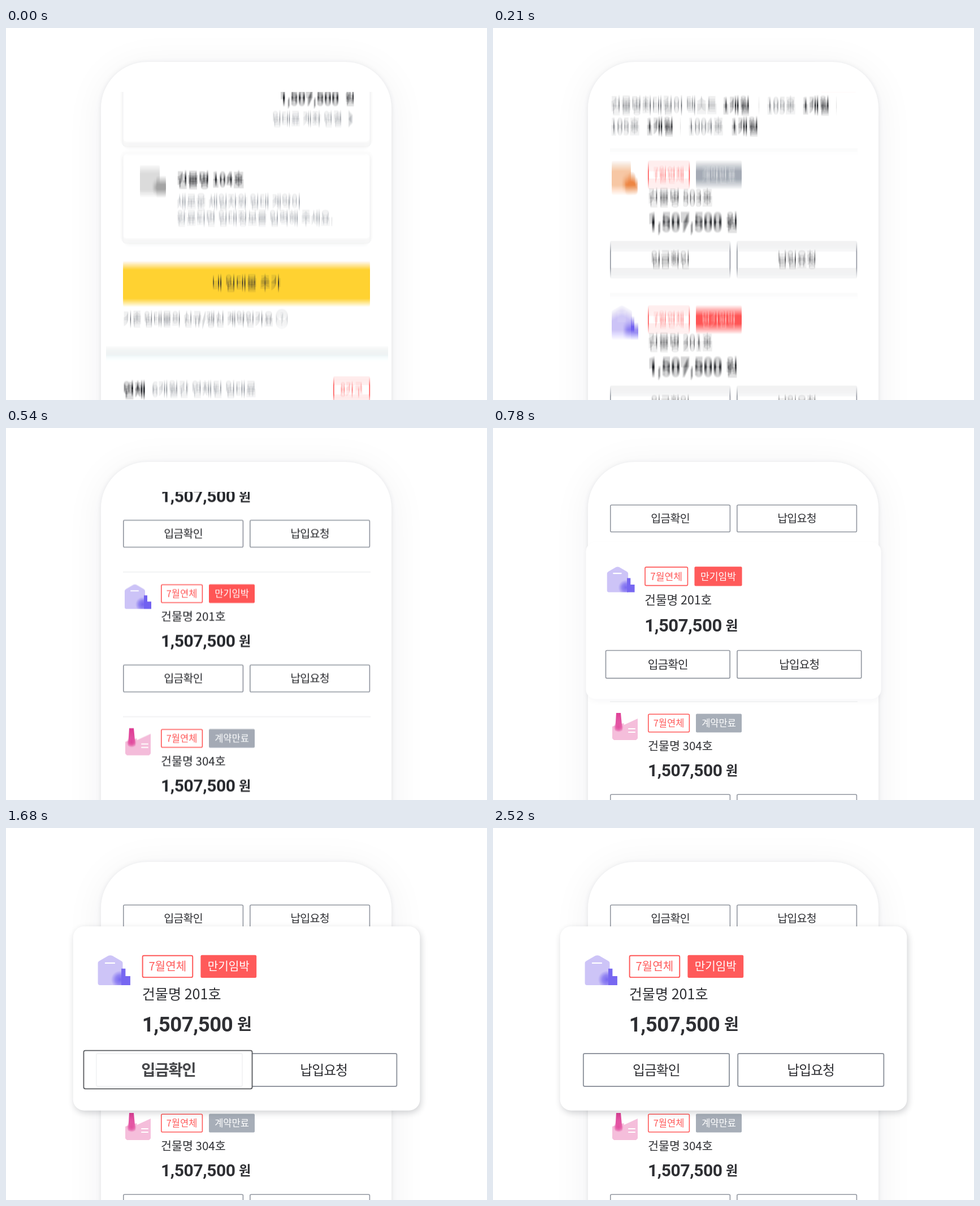
These frames come from a looping animation (851x658 px, 2550 ms). An HTML page with a canvas:

```html
<!DOCTYPE html>
<html lang="ko">
<head>
<meta charset="utf-8">
<style>
  html, body { margin: 0; width: 100%; height: 100%; overflow: hidden; background: #fff; }
  canvas { display: block; }
</style>
</head>
<body>
<canvas id="stage" width="851" height="658"></canvas>
<script>
const LOOP = 2550, STEP = 30, ZOOM = 1.22;
const KOREAN = '"Noto Sans CJK KR", "Noto Sans CJK", sans-serif';
const INK = '#2e2f33', GRAY = '#8d9299', RED = '#ff5a5a', SILVER = '#a7aeb8', LINE = '#9297a0';
const PIVOT = { x: 425.5, y: 361.5 };
const END_SCROLL = 802;

const stage = document.getElementById('stage').getContext('2d');
const list = document.createElement('canvas');
list.width = 851;
list.height = 1560;

const clamp = v => Math.min(1, Math.max(0, v));
const progress = (t, from, to) => clamp((t - from) / (to - from));
const easeOut = k => 1 - (1 - k) ** 2;

// y is the optical middle of the line
function text(g, str, x, y, size, color = INK, weight = 300, align = 'left', track = 0) {
  g.font = `${weight} ${size}px ${KOREAN}`;
  g.letterSpacing = track + 'px';
  g.textAlign = align;
  g.fillStyle = color;
  g.fillText(str, x, y + size * 0.37);
}

function amount(g, x, y, size, wonX) {
  g.font = `700 ${size}px Roboto, sans-serif`;
  g.letterSpacing = size * -0.013 + 'px';
  g.textAlign = 'left';
  g.fillStyle = INK;
  g.fillText('1,507,500', x, y + size * 0.36);
  text(g, '원', wonX, y, size * 0.77, INK, 700);
}

function box(g, x, y, w, h, r, fill, stroke, line = 1.6) {
  g.beginPath();
  g.roundRect(x, y, w, h, r);
  if (fill) { g.fillStyle = fill; g.fill(); }
  if (stroke) { g.strokeStyle = stroke; g.lineWidth = line; g.stroke(); }
}

function shadowBox(g, rect, r, shadows) {
  g.save();
  for (const [alpha, blur, dx, dy] of shadows) {
    g.shadowColor = `rgba(30,35,45,${alpha})`;
    g.shadowBlur = blur;
    g.shadowOffsetX = dx;
    g.shadowOffsetY = dy;
    box(g, ...rect, r, '#fff');
  }
  g.restore();
}

function shape(g, fill, ...points) {
  g.beginPath();
  points.forEach(([x, y]) => g.lineTo(x, y));
  g.closePath();
  g.fillStyle = fill;
  g.fill();
}

function glow(g, x, y, r, rgb) {
  const soft = g.createRadialGradient(x, y, 0, x, y, r);
  soft.addColorStop(0, `rgba(${rgb},.95)`);
  soft.addColorStop(0.5, `rgba(${rgb},.65)`);
  soft.addColorStop(1, `rgba(${rgb},0)`);
  g.fillStyle = soft;
  g.fillRect(x - r, y - r, 2 * r, 2 * r);
}

const icons = {
  house(g) {
    g.save();
    g.beginPath();
    g.moveTo(0, 12);
    g.quadraticCurveTo(0, 10, 3, 8.5);
    g.lineTo(15, 1.5);
    g.quadraticCurveTo(18, 0, 21, 1.5);
    g.lineTo(33, 8.5);
    g.quadraticCurveTo(36, 10, 36, 12);
    g.lineTo(36, 44);
    g.lineTo(3, 44);
    g.quadraticCurveTo(0, 44, 0, 41);
    g.fillStyle = '#cdc4f7';
    g.fill();
    g.clip();
    glow(g, 32, 36, 13, '116,100,240');
    g.restore();
    box(g, 10, 11, 15, 2, 1, '#fff');
    shape(g, '#7767f1', [34, 20], [40, 20], [40, 31], [47, 31], [47, 44], [34, 44]);
  },
  factory(g) {
    shape(g, '#f5bedb', [1, 23], [21, 17], [22, 20], [46, 9], [46, 44], [43, 47], [4, 47], [1, 44]);
    const fade = g.createLinearGradient(0, -1, 0, 33);
    fade.addColorStop(0, '#df3f96');
    fade.addColorStop(0.55, '#e45aa6');
    fade.addColorStop(1, '#f5bedb');
    shape(g, fade, [8, -1], [16, -1], [19, 30], [14, 33], [6, 30]);
    glow(g, 12, 24, 9, '226,75,158');
    box(g, 29, 26, 13, 2, 1, '#fff');
    box(g, 29, 32, 13, 2, 1, '#fff');
  },
  villa(g) {
    box(g, 0, 1, 34, 43, 3, '#f7c8a6');
    glow(g, 31, 33, 14, '236,130,60');
    box(g, 24, 29, 22, 15, 5, '#ee8a4a');
    box(g, 28, 20, 14, 18, 7, '#ee8a4a');
  },
  office(g) {
    box(g, 0, 1, 35, 43, 2, '#dcdcdc');
    glow(g, 33, 33, 12, '150,150,150');
    box(g, 29, 20, 17, 24, 2, '#aaa');
  }
};

function icon(g, name, x, y) {
  g.save();
  g.translate(x, y);
  icons[name](g);
  g.restore();
}

function button(g, x, y, label) {
  box(g, x + 0.8, y - 23.7, 211.6, 47.4, 2, '#fff', LINE);
  text(g, label, x + 106.5, y, 19.5, INK, 300, 'center', -0.8);
}

// y is the middle of the tag row
function item(g, y, name, iconName, tag, tagColor) {
  icon(g, iconName, 210, y - 17);
  box(g, 274.8, y - 15.7, 72.6, 31.4, 2, '#fff', RED);
  text(g, '7월연체', 311, y, 16.5, RED, 300, 'center');
  box(g, 359, y - 16.5, 81, 33, 2, tagColor);
  text(g, tag, 399.5, y, 16.5, '#fff', 300, 'center');
  text(g, name, 274, y + 40, 20.6);
  amount(g, 274, y + 83.5, 30, 412);
  button(g, 207, y + 150, '입금확인');
  button(g, 431, y + 150, '납입요청');
}

function drawList(g) {
  // opaque ground, so that blended samples average correctly
  g.fillStyle = '#fff';
  g.fillRect(0, 0, list.width, list.height);

  const cardShadow = [[0.13, 7, 0, 2]];
  shadowBox(g, [207.5, 20, 436, 188], 6, cardShadow);
  amount(g, 484, 123, 24, 600);
  text(g, '임대료 계좌 연결', 471, 161, 18, GRAY);
  shape(g, GRAY, [606, 152], [614, 161], [606, 170], [606, 166], [610, 161], [606, 156]);

  shadowBox(g, [207.5, 228, 436, 151], 6, cardShadow);
  icon(g, 'office', 237, 249);
  text(g, '건물명 104호', 302, 268, 21, INK, 700);
  text(g, '새로운 세입자와 임대 계약이', 302, 308, 18.8, '#959aa2');
  text(g, '완료되면 임대정보를 입력해 주세요.', 302, 337, 18.8, '#959aa2');

  box(g, 207, 420, 437, 66, 2, '#ffd338');
  text(g, '내 임대물 추가', 425.5, 451, 20.5, INK, 400, 'center');
  text(g, '기존 임대물의 신규/갱신 계약인가요', 207, 515, 17.9, '#777b82');
  box(g, 478, 505, 20, 20, 10, null, '#b5b9bf', 1.3);
  text(g, '?', 488, 515, 14, GRAY, 400, 'center');
  box(g, 177, 570, 499, 13, 0, '#eef3f4');

  text(g, '연체', 207, 640, 22, INK, 700);
  text(g, '6개월간 연체된 임대료', 258, 640, 19.9, GRAY);
  box(g, 579.8, 624, 63.5, 32, 2, '#fff', RED);
  text(g, '8가구', 611.5, 640, 17, RED, 300, 'center');

  const overdue = (x, y, room, monthX, barX) => {
    text(g, room, x, y, 20, '#5f6369');
    text(g, '1개월', monthX, y, 20, INK, 700);
    if (barX) box(g, barX, y - 8, 1, 16, 0, '#ddd');
  };
  overdue(208, 690, '건물명최대길이 텍스트', 406, 470);
  overdue(484, 690, '105호', 547, 607);
  overdue(208, 727, '105호', 271, 331);
  overdue(345, 727, '1004호', 421);

  for (const y of [812, 1068, 1324]) box(g, 207, y - 39, 438, 2, 0, '#f4f5f6');
  item(g, 812, '건물명 503호', 'villa', '계약만료', SILVER);
  item(g, 1068, '건물명 201호', 'house', '만기임박', RED);
  item(g, 1324, '건물명 304호', 'factory', '계약만료', SILVER);
}

// [time, offset, speed per step]
const scrollKeys = [[0, 0, 54], [210, 552, 66], [540, 775, 5], [780, END_SCROLL, 0]];

function scrollAt(t) {
  for (let i = 1; i < scrollKeys.length; i++) {
    const [t0, a, va] = scrollKeys[i - 1], [t1, b, vb] = scrollKeys[i];
    if (t > t1) continue;
    const k = (t - t0) / (t1 - t0), n = (t1 - t0) / STEP;
    return a * (1 + 2 * k) * (1 - k) ** 2 + b * k * k * (3 - 2 * k)
      + n * (va * k * (1 - k) ** 2 - vb * k * k * (1 - k));
  }
  return END_SCROLL;
}

function drawScroll(g, t) {
  const top = scrollAt(t);
  const smear = Math.abs(scrollAt(t + 4) - scrollAt(t - 4));
  const samples = smear < 0.4 ? 1 : 18;
  g.save();
  g.beginPath();
  g.rect(177, 113, 499, 545);
  g.clip();
  for (let i = 0; i < samples; i++) {
    g.globalAlpha = 1 / (i + 1);
    const shift = samples > 1 ? (i / (samples - 1) - 0.5) * smear : 0;
    g.drawImage(list, 0, shift - top);
  }
  g.restore();
}

function drawPopup(g, t) {
  const k = progress(t, 750, 1080);
  if (!k) return;
  const scale = 1 + (ZOOM - 1) * easeOut(k);
  g.save();
  g.translate(PIVOT.x, PIVOT.y);
  g.scale(scale, scale);
  g.translate(-PIVOT.x, -PIVOT.y);
  shadowBox(g, [174, 207.8, 503, 267], 16, [[0.2 * easeOut(k), 12, 2, 4]]);
  item(g, 1068 - END_SCROLL, '건물명 201호', 'house', '만기임박', RED);
  g.restore();
}

function drawPress(g, t) {
  const k = Math.min(progress(t, 1410, 1530), 1 - progress(t, 1650, 1740));
  if (!k) return;
  const scale = 1 + 0.22 * k, w = 260 * scale, h = 59 * scale;
  g.save();
  g.globalAlpha = 1 - (1 - k) ** 2;
  box(g, 286.5 - w / 2, 427.5 - h / 2, w, h, 3, '#fff', '#47494e', 1.8);
  text(g, '입금확인', 287.5, 427.5, 23.8 * scale, INK, 700, 'center', -1);
  g.restore();
}

// position, radius, tilt and angle shortly before landing, then the fall and spin
const coins = [
  { x: 172, y: 360, r: 25, tilt: 0.2, angle: 0.4, fall: 20, spin: 2 },
  { x: 157, y: 420, r: 25, tilt: 0.65, angle: 0.1, fall: 30, spin: -2 },
  { x: 230, y: 489, r: 16, tilt: 0.95, angle: 0.5, fall: 58, spin: 2.5 },
  { x: 377, y: 479, r: 27, tilt: 1.55, angle: -0.53, fall: 50, spin: -2 },
  { x: 389, y: 356, r: 27, tilt: 0.95, angle: 0.72, fall: 20, spin: 1.8 },
  { x: 379, y: 326, r: 10, tilt: 0.4, angle: 0.5, fall: 20, spin: -2.4 }
];
const SETTLED = 15 / 19;

function drawCoin(g, coin, k) {
  const reach = easeOut(k) / easeOut(SETTLED);
  const x = 287 + (coin.x - 287) * reach;
  const y = 428 + (coin.y - 428 - coin.fall * SETTLED ** 3) * reach + coin.fall * k ** 3;
  const turn = coin.spin * (k - SETTLED);
  const tilt = coin.tilt + turn, r = coin.r * clamp(0.3 + k * 1.2);
  const ry = Math.max(0.8, r * Math.abs(Math.cos(tilt)));
  const depth = r * (0.06 + 0.14 * Math.abs(Math.sin(tilt)));
  const disc = (rx, h, fill, dy = 0) => {
    g.beginPath();
    g.ellipse(0, dy, rx, h, 0, 0, 7);
    g.fillStyle = fill;
    g.fill();
  };
  g.save();
  g.translate(x, y);
  g.rotate(coin.angle + turn * 0.3);
  for (let d = depth / 2; d > -depth / 2; d -= 0.5) disc(r, ry, d > 0 ? '#f6b638' : '#fac647', d);
  g.translate(0, -depth / 2);
  const face = g.createLinearGradient(-r, -ry, r, ry);
  face.addColorStop(0, '#ffe55c');
  face.addColorStop(1, '#ffcb3a');
  disc(r, ry, '#ffe25a');
  disc(r * 0.87, ry * 0.87, '#f9c63c');
  disc(r * 0.83, ry * 0.83, face);
  g.scale(1, ry / r);
  g.rotate(0.25);
  g.font = `700 ${r * 1.2}px Roboto, sans-serif`;
  g.letterSpacing = '0px';
  g.textAlign = 'center';
  g.fillStyle = '#ffeb9a';
  g.fillText('$', 0, r * 0.42);
  g.restore();
}

function draw(t) {
  const g = stage;
  g.fillStyle = '#fff';
  g.fillRect(0, 0, 851, 658);
  shadowBox(g, [168, 60, 514, 760], 82, [[0.06, 70, 0, 8], [0.1, 9, 0, 1]]);
  drawScroll(g, t);
  drawPopup(g, t);
  drawPress(g, t);
  if (t > 1710 && t < 2520) {
    const k = progress(t, 1710, 2280);
    coins.forEach(coin => drawCoin(g, coin, k));
  }
}

drawList(list.getContext('2d'));
const start = performance.now();
function tick() {
  const t = (performance.now() - start) % LOOP;
  draw(Math.floor(t / STEP) * STEP);
  requestAnimationFrame(tick);
}
tick();
</script>
</body>
</html>
```
